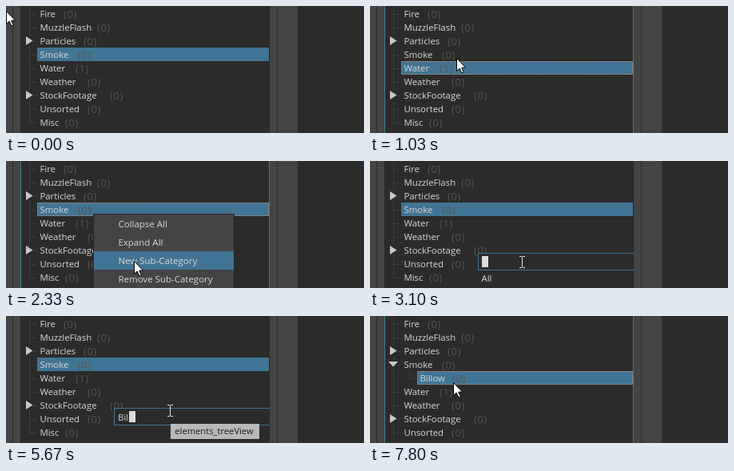
Animation of 448x159 px, one loop 8 s. Source, as an HTML page with a canvas:

```html
<!DOCTYPE html>
<html lang="en">
<head>
<meta charset="utf-8">
<title>Adding a sub-category</title>
<style>
html, body { margin: 0; width: 100%; height: 100%; overflow: hidden; background: #2b2b2b; }
canvas { display: block; width: 448px; height: 159px; }
</style>
</head>
<body>
<canvas id="stage" width="448" height="159"></canvas>
<script>
const ctx = document.getElementById('stage').getContext('2d');
const LOOP = 8000, ROW = 17, TOP = 1, RIGHT = 329;
const FACE = '"Open Sans", "Noto Sans", sans-serif';
const BLUE = '#417494', DARK = '#2b2b2b', GREY = '#444444', INK = '#d8d8d8';

// Moments of the story, in ms
const AT = {
  pickWater: 800, pickSmoke: 1330, menu: 1870, edit: 3100,
  tooltip: 4670, type: 5130, done: 6270, pickBillow: 7600
};
const KEY_GAP = 174, BLINK = 530;

const TREE = [
  { name: 'Fire', countX: 72 },
  { name: 'MuzzleFlash', countX: 114 },
  { name: 'Particles', countX: 97, parent: true },
  { name: 'Smoke', countX: 90 },
  { name: 'Water', countX: 87, count: 1 },
  { name: 'Weather', countX: 102 },
  { name: 'StockFootage', countX: 130, parent: true },
  { name: 'Unsorted', countX: 102 },
  { name: 'Misc', countX: 74 }
];
const BILLOW = { name: 'Billow', countX: 103, indent: 20 };
const MENU = ['Collapse All', 'Expand All', 'New Sub-Category', 'Remove Sub-Category'];

// Pointer glides: from, until, to x, to y
const GLIDES = [
  [0, 800, 112, 79],
  [870, 1030, 108, 65],
  [2070, 2440, 174, 141],
  [2440, 2670, 190, 126],
  [3960, 3970, 205, 118],
  [7140, 7170, 168, 115],
  [7170, 7600, 102, 84],
  [7740, 7800, 104, 83]
];

function rect(x, y, w, h, color) {
  ctx.fillStyle = color;
  ctx.fillRect(x, y, w, h);
}

function text(str, x, y, color = INK, size = 11.4) {
  ctx.font = `${size}px ${FACE}`;
  ctx.fillStyle = color;
  ctx.fillText(str, x, y);
}

function poly(points, fill, stroke) {
  ctx.beginPath();
  points.forEach(([x, y]) => ctx.lineTo(x, y));
  ctx.closePath();
  ctx.fillStyle = fill;
  ctx.fill();
  if (!stroke) return;
  ctx.strokeStyle = stroke;
  ctx.stroke();
}

function pointerAt(t) {
  let x = 0, y = 6;
  for (const [from, until, toX, toY] of GLIDES) {
    const k = Math.min(1, Math.max(0, (t - from) / (until - from)));
    const ease = k * k * (3 - 2 * k);
    x += (toX - x) * ease;
    y += (toY - y) * ease;
  }
  return [Math.round(x), Math.round(y)];
}

function panels(focused) {
  rect(0, 0, 448, 159, DARK);
  rect(0, 0, 18, 159, GREY);
  rect(330, 0, 35, 159, GREY);
  const edge = focused ? '#3a7f8a' : '#282828';
  for (const x of [8, 339]) rect(x, 0, 1, 159, DARK);
  for (const x of [18, RIGHT]) rect(x, 0, 1, 159, edge);
}

function dottedFrame(x, y, w, h, color) {
  for (let i = 0; i < w; i++) {
    for (const j of [0, h - 1]) if ((i + j) % 2 === 0) rect(x + i, y + j, 1, 1, color);
  }
  for (let j = 0; j < h; j++) {
    for (const i of [0, w - 1]) if ((i + j) % 2 === 0) rect(x + i, y + j, 1, 1, color);
  }
}

function selection(x, y, focused) {
  rect(x, y, RIGHT - x, ROW, BLUE);
  if (focused) dottedFrame(x, y, RIGHT - x, ROW, '#be8b6b');
}

function treeRow({ name, countX, count = 0, parent, indent = 0 }, i, state) {
  const y = TOP + i * ROW, mid = y + 9;
  rect(29, y, 1, name === 'Misc' ? 9 : ROW, '#3d3d3d');
  if (indent) rect(29 + indent, y, 1, 9, '#3d3d3d');
  rect(29 + indent, mid, 9, 1, '#3d3d3d');
  if (name === state.selected) selection(39 + indent, y, state.focused);
  if (parent) {
    rect(24, y + 2, 10, 13, DARK);
    poly([[25, mid - 6], [33.5, mid - 0.5], [25, mid + 5]], '#c8c8c8');
  }
  if (name === 'Smoke' && state.expanded) {
    rect(23, y + 4, 13, 9, DARK);
    poly([[23, mid - 4], [35, mid - 4], [29, mid + 2.5]], '#c8c8c8');
  }
  text(name, 42.4 + indent, y + 13);
  ctx.letterSpacing = '0.6px';
  text(`(${count})`, countX, y + 13.5, '#555555', 13);
  ctx.letterSpacing = '0px';
}

function tree(state) {
  const rows = TREE.slice();
  if (state.expanded) rows.splice(4, 0, BILLOW);
  rows.forEach((row, i) => treeRow(row, i, state));
}

function menu([px, py]) {
  rect(109, 66, 177, 93, '#252525');
  rect(110, 67, 175, 92, GREY);
  const hover = px > 109 ? Math.floor((py - 67) / 23) : -1;
  MENU.forEach((item, i) => {
    const y = 67 + i * 23;
    if (i === hover) rect(110, y, 175, 23, BLUE);
    text(item, 140.4, y + 15.5, INK, 11.5);
  });
}

function editor(t) {
  rect(135, 115, 195, 22, BLUE);
  rect(136, 116, 194, 20, DARK);
  rect(135, 137, 194, 22, DARK);

  const typed = 'Billow'.slice(0, Math.max(0, Math.floor((t - AT.type) / KEY_GAP) + 1));
  text(typed, 140.3, 130.5, INK, 11);
  const caretX = typed ? Math.round(138.5 + ctx.measureText(typed).width) : 140;
  const blinkOn = Math.floor((t - AT.edit) / BLINK) % 2 === 0;
  if (typed || blinkOn) rect(caretX, 119, 8, 14, '#dcdcdc');

  // Matching entries below the field
  if (typed.length < 2) text(typed ? 'Blood' : 'All', 139.5, 151);

  if (t >= AT.tooltip) {
    rect(206, 135, 111, 19, '#b9b9b9');
    text('elements_treeView', 211.3, 148, '#1c1c1c', 11.2);
  }
}

function arrow([x, y]) {
  ctx.save();
  ctx.translate(x + 0.5, y + 0.5);
  poly([[0, 0], [0, 16], [3.6, 12.6], [6.4, 18.4], [8.8, 17.4], [6.2, 11.7], [11, 11.5]], '#ffffff', '#000000');
  ctx.restore();
}

function iBeam([x, y]) {
  rect(x, y - 6, 1, 13, '#e6e6e6');
  for (const dy of [-7, 7]) {
    for (const dx of [-3, 1]) rect(x + dx, y + dy, 3, 1, '#e6e6e6');
  }
}

function selectedAt(t) {
  if (t >= AT.pickBillow) return 'Billow';
  return t >= AT.pickWater && t < AT.pickSmoke ? 'Water' : 'Smoke';
}

function draw(t) {
  const editing = t >= AT.edit && t < AT.done;
  const focused = (t >= AT.pickWater && t < AT.edit) || t >= AT.pickBillow;
  const pointer = pointerAt(t);
  panels(focused);
  tree({ focused, expanded: t >= AT.done, selected: selectedAt(t) });
  if (t >= AT.menu && t < AT.edit) menu(pointer);
  if (editing) editor(t);
  (editing ? iBeam : arrow)(pointer);
}

const start = performance.now();
function tick() {
  draw((performance.now() - start) % LOOP);
  requestAnimationFrame(tick);
}
tick();
</script>
</body>
</html>
```
